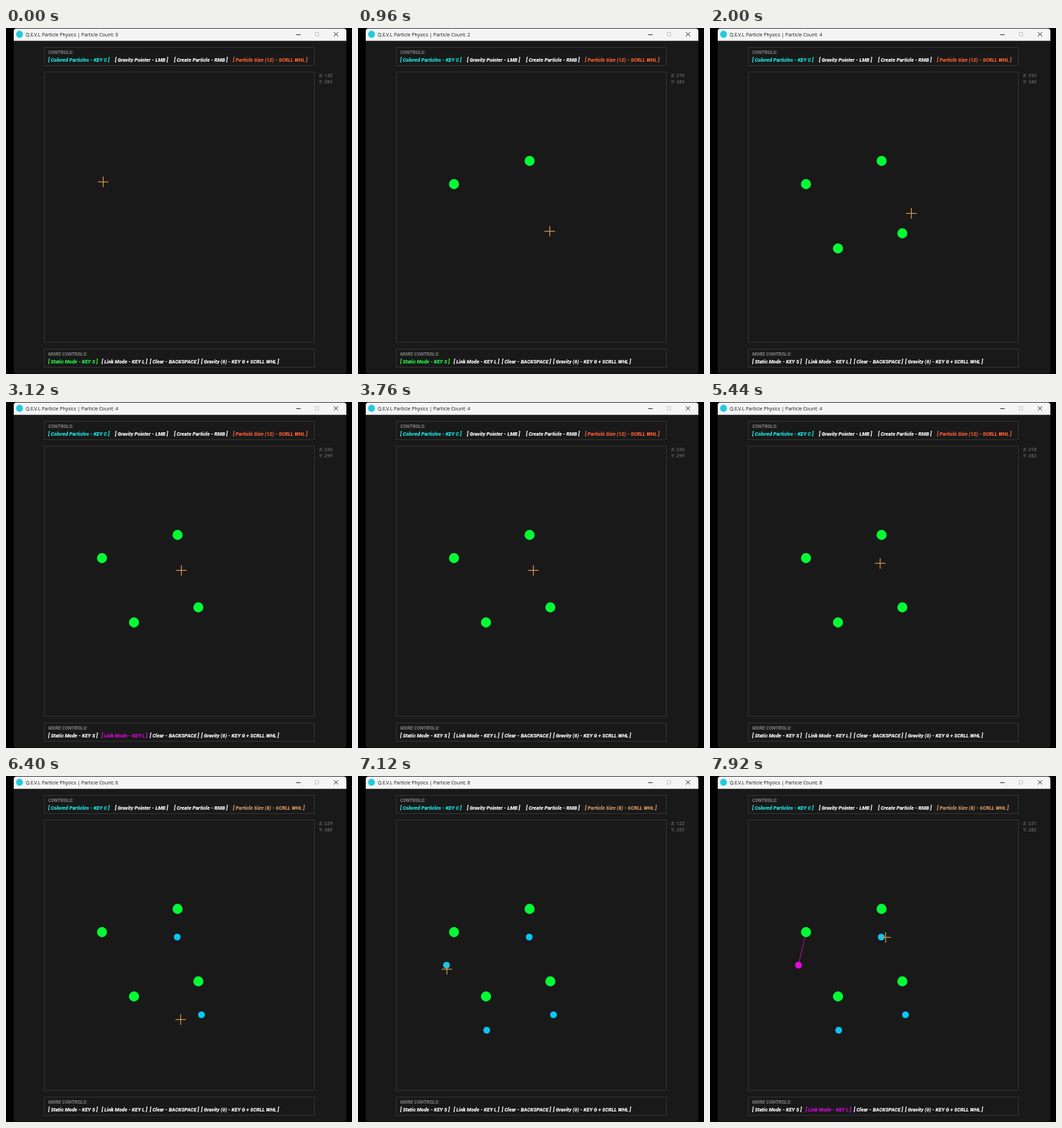
Write an HTML page with a canvas that moves like this. It is 492 px wide and 492 px high and loops after 8000 ms.

```html
<!DOCTYPE html>
<html lang="en">
<head>
<meta charset="utf-8">
<title>Particle Physics</title>
<style>
html, body { margin: 0; width: 100%; height: 100%; overflow: hidden; background: #000; }
canvas { display: block; width: 492px; height: 492px; }
</style>
</head>
<body>
<canvas id="stage"></canvas>
<script>
const SIZE = 492, LOOP = 8000, STEP = 80, TRAVEL = 400;
const BOX = { x: 54.6, y: 63, scale: 0.59 };
const HUD = "italic 900 7.15px Roboto, 'Open Sans', sans-serif";
const HEAD = "italic 900 6.75px Roboto, 'Open Sans', sans-serif";
const TITLE = "6.85px 'Open Sans', 'Noto Sans', sans-serif";
const GREEN = "#04fb35", BLUE = "#06c8f2", PINK = "#e60ae0";

const canvas = document.getElementById("stage");
const ratio = window.devicePixelRatio || 1;
canvas.width = canvas.height = SIZE * ratio;
const ctx = canvas.getContext("2d");
ctx.scale(ratio, ratio);

const at = (t, x, y) => ({ t, x, y });
const within = (t, a, b) => t >= a && t < b;
const countDown = (t, from, to, start, gap) =>
  Math.max(to, from - Math.max(0, Math.floor((t - start) / gap) + 1));

// a round of clicks, one particle every `gap` ms
const round = (start, gap, size, color, ...spots) =>
  spots.map(([x, y], i) => ({ t: start + i * gap, x, y, size, color }));

const large = round(160, 420, 12, GREEN, [136.5, 222], [244, 189], [273.5, 292], [182, 313.5]);
const small = round(5920, 350, 8, BLUE, [243.5, 229], [278, 339.5], [183, 361.5], [125.8, 269]);
const particles = [...large, ...small];
const linkFrom = small[3], linkTo = large[0];
const LINKED = 7520;

// where the pointer has arrived at time t
const stops = [
  at(0, 138.3, 218.8), ...large,
  at(2000, 286.4, 263.6), at(2480, 249.4, 239.4), at(5360, 242, 229.4), ...small,
  at(7120, 126.4, 274.8), at(LINKED, linkTo.x, linkTo.y), at(7840, 249.7, 229.4)
];

function pointerAt(t) {
  const i = stops.findIndex(s => s.t > t);
  if (i < 0) return stops[stops.length - 1];
  const a = stops[i - 1], b = stops[i];
  const span = Math.min(TRAVEL, b.t - a.t);
  const p = Math.max(0, 1 - (b.t - t) / span), e = p * p * (3 - 2 * p);
  return at(t, a.x + (b.x - a.x) * e, a.y + (b.y - a.y) * e);
}

function text(str, x, y, color, font = HUD) {
  ctx.font = font;
  ctx.fillStyle = color;
  ctx.fillText(str, x, y);
}

function line(x0, y0, x1, y1, color, width = 1) {
  ctx.strokeStyle = color;
  ctx.lineWidth = width;
  ctx.beginPath();
  ctx.moveTo(x0, y0);
  ctx.lineTo(x1, y1);
  ctx.stroke();
}

function disc(x, y, r, color) {
  ctx.fillStyle = color;
  ctx.beginPath();
  ctx.arc(x, y, r, 0, Math.PI * 2);
  ctx.fill();
}

function panel(x, y, w, h, radii, color) {
  ctx.fillStyle = color;
  ctx.beginPath();
  ctx.roundRect(x, y, w, h, radii);
  ctx.fill();
}

function frame(x, y, w, h, color = "#333") {
  ctx.strokeStyle = color;
  ctx.lineWidth = 1;
  ctx.strokeRect(x, y, w, h);
}

function drawWindow(count) {
  ctx.fillStyle = "#000";
  ctx.fillRect(0, 0, SIZE, SIZE);
  panel(11, 0.7, 473, 490.8, 4, "#191919");
  panel(11, 0.7, 473, 17.6, [4, 4, 0, 0], "#f5f5f5");
  disc(19.2, 9, 4.9, "#20cbe2");
  text("Q.E.V.L Particle Physics | Particle Count: " + count, 28, 11.7, "#151515", TITLE);
  line(412.5, 9.5, 419, 9.5, "#222", 0.9);
  frame(439.5, 6.5, 5, 5, "#c8c8c8");
  line(466.3, 6, 472.3, 12, "#222", 0.9);
  line(472.3, 6, 466.3, 12, "#222", 0.9);
  frame(54.5, 27.5, 384, 26);
  frame(54.5, 62.7, 384, 384.3);
  frame(54.5, 456.5, 384, 26);
}

function drawControls(t) {
  const size = countDown(t, 12, 8, 5520, 80);
  const gravity = countDown(t, 6, 0, 4000, 160);
  const k = (12 - size) / 4;
  const sizeColor = `rgb(${250 - 38 * k},${98 + 52 * k},${52 + 50 * k})`;
  const linking = within(t, 2880, 3600) || t >= 7200;

  text("CONTROLS:", 60, 36.6, "#777", HEAD);
  text("[ Colored Particles - KEY C ]", 60, 48.3, "#1ce8ea");
  text("[ Gravity Pointer - LMB ]", 155, 48.3, "#fff");
  text("[ Create Particle - RMB ]", 239, 48.3, "#fff");
  text(`[ Particle Size (${size}) - SCRLL WHL ]`, 322.8, 48.3, sizeColor);

  text("MORE CONTROLS:", 60, 465.6, "#777", HEAD);
  text("[ Static Mode - KEY S ]", 60, 477.3, t < 1680 ? "#22f844" : "#fff");
  text("[ Link Mode - KEY L ]", 136, 477.3, linking ? "#d806d8" : "#fff");
  text("[ Clear - BACKSPACE ]", 204.5, 477.3, "#fff");
  text(`[ Gravity (${gravity}) - KEY G + SCRLL WHL ]`, 277.5, 477.3,
    within(t, 3840, 5040) ? "#b9bd7c" : "#fff");
}

function drawPointer({ x, y }) {
  line(x - 7.5, y, x + 7.5, y, "#dc9250", 1.2);
  line(x, y - 7.5, x, y + 7.5, "#dc9250", 1.2);
  text("X: " + Math.round((x - BOX.x) / BOX.scale), 445, 69.8, "#555", HEAD);
  text("Y: " + Math.round((y - BOX.y) / BOX.scale), 445, 79, "#555", HEAD);
}

function draw(t) {
  const live = particles.filter(p => t >= p.t);
  drawWindow(live.length);
  drawControls(t);
  if (t >= LINKED) line(linkFrom.x, linkFrom.y, linkTo.x, linkTo.y, "#b80cb8");
  for (const p of live) {
    const picked = p === linkFrom && t >= 7280;
    disc(p.x, p.y, p.size * 0.6, picked ? PINK : p.color);
  }
  drawPointer(pointerAt(t));
}

const start = performance.now();
function tick() {
  const t = (performance.now() - start) % LOOP;
  draw(Math.floor(t / STEP) * STEP);
  requestAnimationFrame(tick);
}
tick();
</script>
</body>
</html>
```
